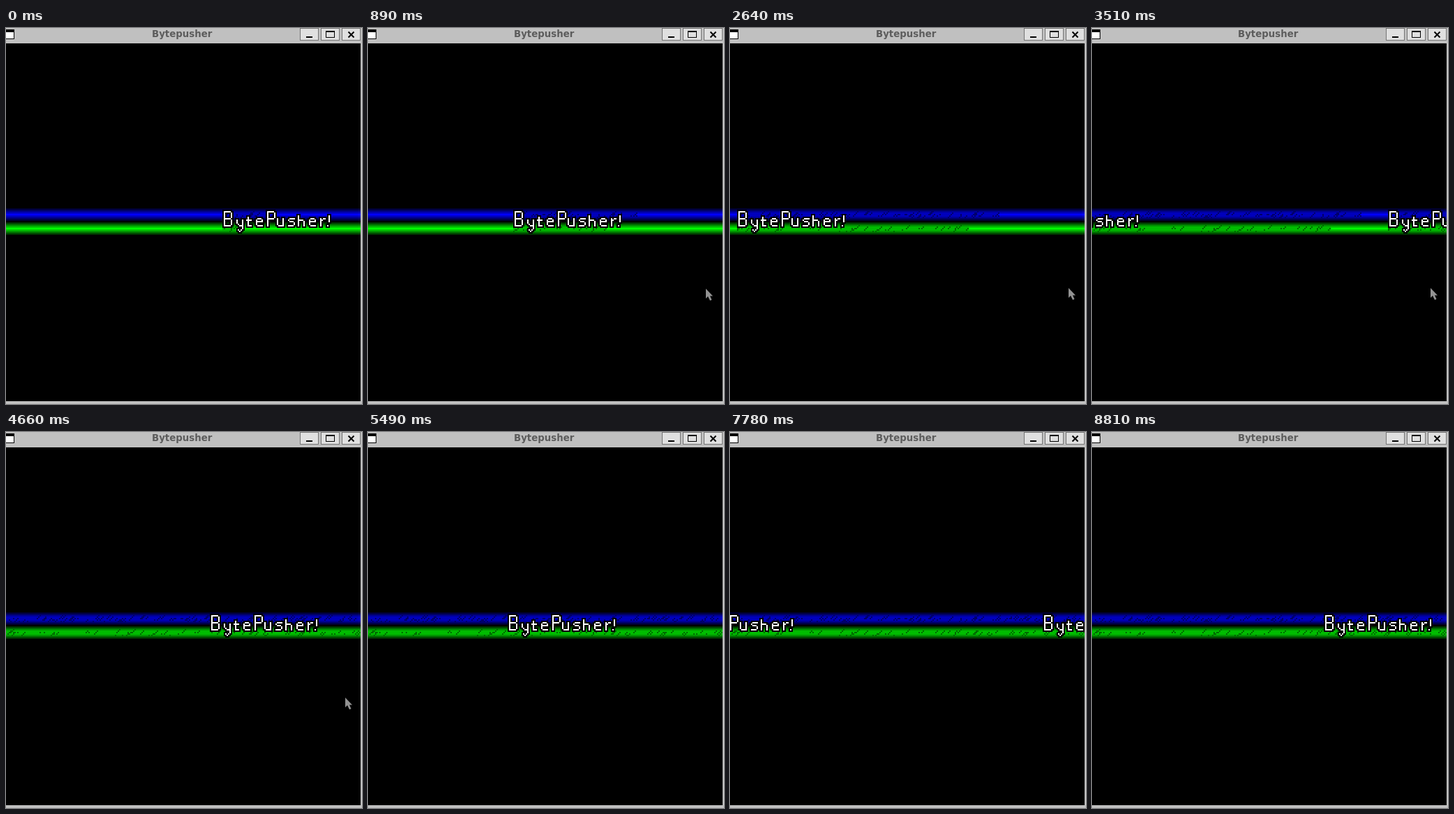
Recreate the animation shown at these times as an HTML page with a canvas. Size 510x538 px, loop 8.84 s.

```html
<!DOCTYPE html>
<html lang="en">
<head>
<meta charset="utf-8">
<title>Bytepusher</title>
<style>
  html, body { margin: 0; width: 100%; height: 100%; overflow: hidden; background: #c0c0c0; }
  canvas, svg { position: absolute; left: 0; top: 0; display: block; }
  text { font: bold 13.333px "DejaVu Sans", sans-serif; fill: #5c5c5c; }
</style>
</head>
<body>
<canvas id="screen" width="510" height="538"></canvas>
<svg width="510" height="538" viewBox="0 0 510 538">
  <g shape-rendering="crispEdges">
    <path fill="#000" d="M0 2h12v14H0z"/>
    <path fill="#fff" d="M0 6h11v9H0z"/>
    <path fill="#e0e0e0" stroke="#747474" d="M421.5 .5h26v17h-26zM451.5 .5h26v17h-26zM481.5 .5h26v17h-26z"/>
    <path fill="#000" d="M430 12h9v2h-9z"/>
    <path fill="#000" fill-rule="evenodd" d="M458 4h13v10h-13zM459 6h11v7h-11z"/>
  </g>
  <path stroke="#000" stroke-width="2" d="M490.500 5.500l8 8M498.500 5.500l-8 8"/>
  <text x="209" y="13">Bytepusher</text>
  <path id="cursor" fill="#929292" d="M0 0V14L3 11L6 17L8.500 16L6 10.500H10Z"/>
</svg>
<script>
const ctx = document.getElementById('screen').getContext('2d');
const cursor = document.getElementById('cursor');
const LOOP = 8840, STEPS = 279, STEP = LOOP / STEPS;
const WIDTH = 508, WRAP = 512, CELL = 2, LEFT = -4;

// Step number and unwrapped left edge of the scrolling text.
const scrollKeys = [[0, 310], [55, 108], [111, -88], [147, -220], [199, -406], [245, -576], [278, -692]];

// Advance, first row and pixel rows of each letter.
const glyphs = {
  B: [9, 0, '#####. #....# #....# #....# #....# #####. #....# #....# #....# #....# #####.'],
  P: [7, 0, '#####. #....# #....# #....# #....# #####. #..... #..... #..... #..... #.....'],
  y: [7, 6, '#...# #...# #...# .#..# ..### ....# ....# .#.#. ..#..'],
  t: [7, 4, '.#.. .#.. #### .#.. .#.. .#.. .###'],
  e: [8, 5, '.###. #...# ##### #.... #.... .####'],
  u: [8, 5, '#...# #...# #...# #...# #...# .####'],
  s: [7, 5, '.#### #.... .###. ....# ....# ####.'],
  h: [8, 3, '#.... #.... #.... ####. #...# #...# #...# #...#'],
  r: [5, 5, '#.## ##.. #... #... #... #...'],
  '!': [3, 3, '.# .# .# .# .# .. .. #.']
};

function layOut(message) {
  const cells = [];
  let column = 1;
  for (const letter of message) {
    const [advance, top, rows] = glyphs[letter];
    rows.split(' ').forEach((row, y) => [...row].forEach((dot, x) => {
      if (dot === '#') cells.push([column + x, top + y]);
    }));
    column += advance;
  }
  return cells;
}
const textCells = layOut('BytePusher!');

// The text leaves a faded, scratched trail left of each band's limit.
const bands = [
  { top: 258, limit: 385, density: 0.45, color: v => `rgb(0,0,${v})`, seed: 3 },
  { top: 278, limit: 342, density: 0.26, color: v => `rgb(0,${v},0)`, seed: 17 }
];

function hash(n, seed) {
  const v = Math.sin(n * 127.1 + seed * 311.7) * 43758.5453;
  return v - Math.floor(v);
}

function scratches({ density, seed }) {
  const marks = [];
  for (let c = 0; c < 256; c++) {
    if (hash(c, seed) > density) continue;
    const row = 4 + Math.floor(hash(c, seed + 1) * 3);
    const length = 1 + Math.floor(hash(c, seed + 2) * 3);
    for (let i = 0; i < length; i++) marks.push([LEFT + (c + i) * CELL, row - i]);
  }
  return marks;
}
for (const band of bands) band.marks = scratches(band);

function textLeft(step) {
  let i = 1;
  while (step > scrollKeys[i][0]) i++;
  const [s0, x0] = scrollKeys[i - 1], [s1, x1] = scrollKeys[i];
  return CELL * Math.round((x0 + (x1 - x0) * (step - s0) / (s1 - s0)) / CELL);
}

function rect(color, x, y, w, h) {
  ctx.fillStyle = color;
  ctx.fillRect(x, y, w, h);
}

function glow(band, from, to, ceiling) {
  for (let row = 0; row < 9; row++) {
    const level = 255 - 51 * Math.abs(row - 4);
    rect(band.color(Math.min(level, ceiling)), from, band.top + row * CELL, to - from, CELL);
  }
}

function drawBand(band, left) {
  glow(band, 0, WIDTH, 255);
  for (let shift = 0; shift < 3 * WRAP; shift += WRAP) {
    const from = Math.max(left + shift, LEFT), to = Math.min(band.limit + shift, WIDTH);
    if (to <= from) continue;
    glow(band, from, to, 188);
    for (const [x, row] of band.marks)
      if (x >= from && x < to) rect(band.color(108), x, band.top + row * CELL, CELL, CELL);
  }
}

function drawText(x) {
  const dot = (color, c, r, size) => rect(color, x + c * CELL, 262 + r * CELL, size * CELL, size * CELL);
  for (const [c, r] of textCells) dot('#000', c - 1, r - 1, 3);
  for (const [c, r] of textCells) dot('#fff', c, r, 1);
}

function placeCursor(t) {
  const part = (from, to) => Math.max(0, Math.min(1, (t - from) / (to - from)));
  const enter = 1 - part(600, 920), swing = part(880, 1500), leave = part(4600, 4960);
  const x = 485 - 16 * enter + 16 * Math.sin(Math.PI * swing) + 26 * leave ** 2;
  const y = 372 + 166 * enter ** 2 + 46 * leave;
  cursor.setAttribute('visibility', enter < 1 && leave < 1 ? 'visible' : 'hidden');
  cursor.setAttribute('transform', `translate(${Math.round(x)} ${Math.round(y)})`);
}

function render(time) {
  const t = time % LOOP;
  const step = Math.min(STEPS - 1, Math.floor((t + 10) / STEP));
  const left = textLeft(step);

  rect('#c0c0c0', 0, 0, 510, 538);
  rect('#000', 0, 22, WIDTH, 512);
  ctx.save();
  ctx.beginPath();
  ctx.rect(0, 22, WIDTH, 512);
  ctx.clip();
  for (const band of bands) drawBand(band, left);
  for (let shift = 0; shift < 3 * WRAP; shift += WRAP) drawText(left + shift);
  ctx.restore();
  placeCursor(t);
}

const start = performance.now();
function frame() {
  render(performance.now() - start);
  requestAnimationFrame(frame);
}
frame();
</script>
</body>
</html>
```
